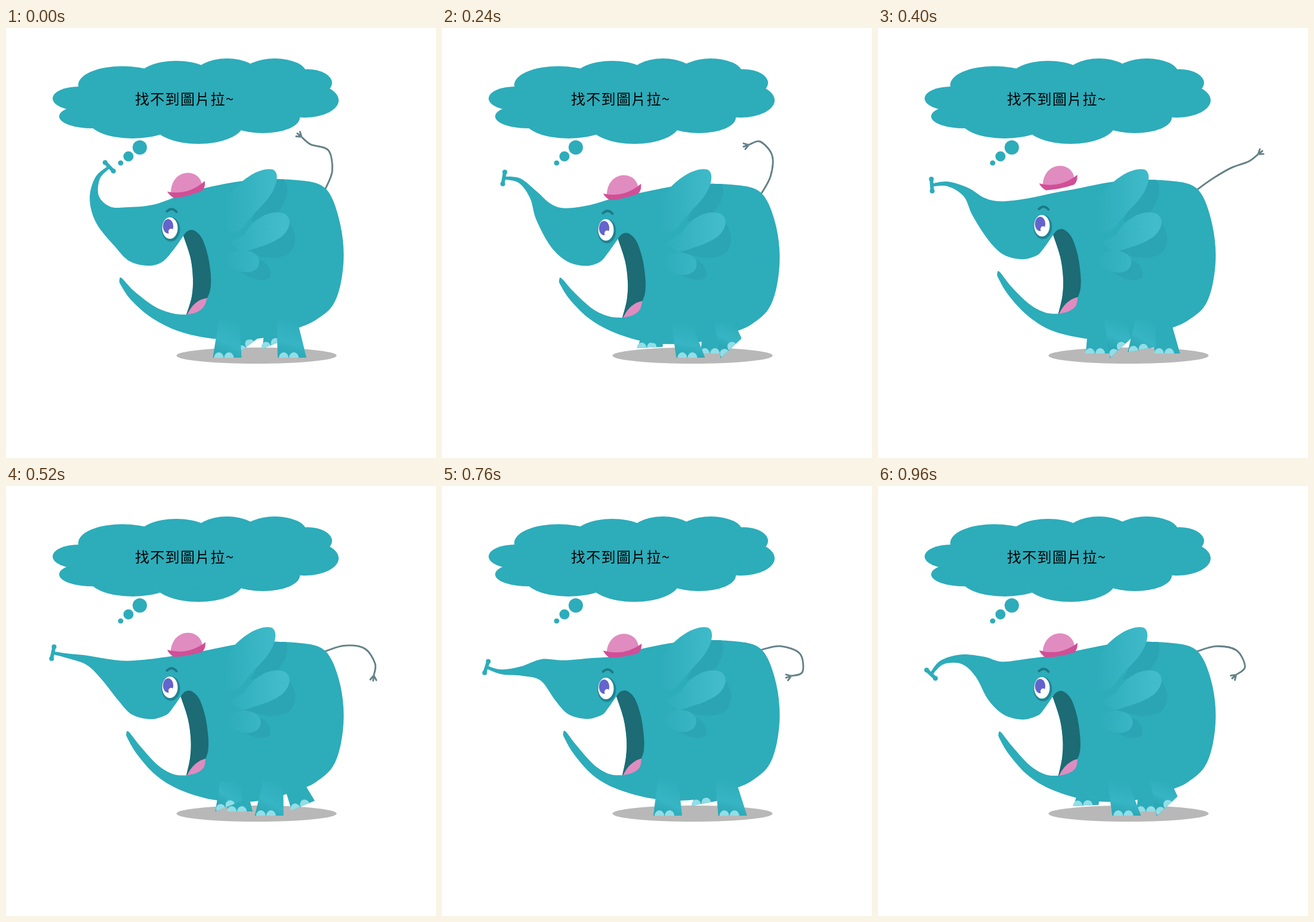
An HTML page with a canvas that plays this animation: 720 px wide and 720 px high, repeating every 1 s.

```html
<!DOCTYPE html>
<html lang="zh-Hant">
<head>
<meta charset="utf-8">
<style>
html, body { margin: 0; width: 100%; height: 100%; overflow: hidden; background: #fff; }
canvas { display: block; }
</style>
</head>
<body>
<canvas id="stage" width="720" height="720"></canvas>
<script>
const ctx = document.getElementById('stage').getContext('2d');
const { PI, sin, cos, exp, sqrt } = Math;
const SKIN = '#2dacba', PINK = '#e08cc0', TOE = '#93dde6', DARK = '#1d6b74';
const rad = deg => deg * PI / 180;

// One stride takes 18 steps of 40 ms; the trunk swings once per loop
const STRIDE = 18;
const GAIT = [0, 3, 6, 10, 13, 17, 18];
const HEAD = [0, 10, 3, -4, 2, -4, 0];
const BELLY = [0, 12, 7, 1, 7, 0, 0];
const HAT = [0, 12, 4, -12, 3, -5, 0];

const SWING = [0, 6, 10, 13, 17, 21, 24];
const TRUNK_MID = [63, 59, 49, 27, -11, 10, 22];
const TRUNK_TIP = [136, 10, -4, 12, 37, -11, -47];

// Smooth interpolation between key values
function at(keys, vals, f) {
  const last = keys.length - 1;
  let i = 0;
  while (i < last - 1 && f >= keys[i + 1]) i++;
  const slope = k => {
    const a = Math.max(k - 1, 0), b = Math.min(k + 1, last);
    return (vals[b] - vals[a]) / (keys[b] - keys[a]);
  };
  const d = keys[i + 1] - keys[i], u = (f - keys[i]) / d, v = 1 - u;
  return v * v * ((1 + 2 * u) * vals[i] + u * d * slope(i)) +
         u * u * ((1 + 2 * v) * vals[i + 1] - v * d * slope(i + 1));
}

// Joints of a limb; side is -1 when angle 0 points left, 1 when it points right
function chain(x, y, angles, lengths, side) {
  const pts = [[x, y]];
  angles.forEach((a, i) => {
    x += side * lengths[i] * cos(rad(a));
    y -= lengths[i] * sin(rad(a));
    pts.push([x, y]);
  });
  return pts;
}

// Adds a curve through the points, joined to what is already in the path
function curve(path, pts, start) {
  path[start ? 'moveTo' : 'lineTo'](...pts[0]);
  for (let i = 0; i < pts.length - 1; i++) {
    const p = pts[i], q = pts[i + 1], a = pts[i - 1] || p, b = pts[i + 2] || q;
    path.bezierCurveTo(p[0] + (q[0] - a[0]) / 6, p[1] + (q[1] - a[1]) / 6,
      q[0] - (b[0] - p[0]) / 6, q[1] - (b[1] - p[1]) / 6, ...q);
  }
  return path;
}

function fill(path, color) { ctx.fillStyle = color; ctx.fill(path); }

function stroke(path, color, width) {
  ctx.strokeStyle = color;
  ctx.lineWidth = width;
  ctx.lineCap = ctx.lineJoin = 'round';
  ctx.stroke(path);
}

function oval(x, y, rx, ry, color) {
  ctx.beginPath();
  ctx.ellipse(x, y, rx, ry, 0, 0, 7);
  ctx.fillStyle = color;
  ctx.fill();
}

function shifted(dx, dy, draw) {
  ctx.save();
  ctx.translate(dx, dy);
  draw();
  ctx.restore();
}

function drawCloud() {
  [[195,95,74,31], [285,85,65,30], [370,80,55,29], [450,76,53,25], [505,92,41,23],
   [500,121,57,29], [430,150,62,26], [322,160,76,34], [212,153,75,32], [145,148,56,20],
   [123,118,45,20], [310,120,190,50], [224,200,12,12], [205,215,8.5,8.5], [192,226,4.5,4.2]
  ].forEach(e => oval(...e, SKIN));
  ctx.fillStyle = '#000';
  ctx.font = '500 24px "Noto Sans CJK TC", "Noto Sans CJK", sans-serif';
  ctx.letterSpacing = '1.3px';
  ctx.fillText('找不到圖片拉~', 216, 128);
}

// The foot slides back on the ground for half a stride, then swings forward
function drawLeg(f, dy, mid, delay, near) {
  const p = (f + delay) % STRIDE / STRIDE, q = Math.max(0, 2 * p - 1);
  const x = mid + (p < .5 ? 138 * p - 34 : 35 - 69 * q * q * (3 - 2 * q));
  const y = (near ? 552 : 545) - 17 * sqrt(sin(PI * q));
  const a = -rad(75) * sin(PI * q) * (1 - q);
  const half = near ? 24 : 21, hip = mid * .4 + x * .6 - 4, top = 488 + dy;
  const cx = half * cos(a), cy = half * sin(a);
  const leg = new Path2D();
  leg.moveTo(hip - 17, top);
  leg.lineTo(x - cx, y - cy);
  leg.lineTo(x + cx, y + cy);
  leg.lineTo(hip + 17, top);
  fill(leg, SKIN);
  if (near) {
    const g = ctx.createLinearGradient(hip + 12, top, x - 14, y);
    g.addColorStop(0, 'rgba(64,190,206,0)');
    g.addColorStop(.6, 'rgba(64,190,206,.5)');
    g.addColorStop(1, 'rgba(40,155,168,.3)');
    fill(leg, g);
  }
  ctx.save();
  ctx.translate(x, y);
  ctx.rotate(a);
  ctx.fillStyle = TOE;
  for (const t of [-14, 3]) {
    ctx.beginPath();
    ctx.ellipse(t, 0, 8, 9, 0, PI, 0);
    ctx.fill();
  }
  ctx.restore();
}

// The tail unrolls from an upward curl into a downward one
function drawTail(t, dy) {
  const curl = s => 1.05 * sin(PI / 2 * cos(PI * s / .75));
  const k = curl(t), bend = 75 * curl(t - .06) - 100 * exp(-12 * t);
  const root = 40 + 28 * k;
  const pts = chain(535, 269 + dy, [root, root + 30 * k, root + 88 * k, root + 88 * k + bend],
    [32, 35, 31, 20], 1);
  const tail = curve(new Path2D(), pts, true);
  const [p, q] = pts.slice(-2), dir = Math.atan2(q[1] - p[1], q[0] - p[0]);
  for (const s of [-.6, 0, .6]) {
    tail.moveTo(...q);
    tail.lineTo(q[0] + 9 * cos(dir + s), q[1] + 9 * sin(dir + s));
  }
  stroke(tail, '#55737a', 2.8);
  stroke(tail, '#7f9ea3', .7);
}

// Tapered trunk: its two edges from base to tip, and the fork at the end
function trunkShape(f, t, x, y) {
  const angles = [16, 37 + 10 * cos(2 * PI * (t - .24) / .85), at(SWING, TRUNK_MID, f),
    120 * exp(-2.5 * t) - 20, at(SWING, TRUNK_TIP, f)];
  const pts = chain(x, y, angles, [36, 35, 33, 33, 27], -1);
  const edge = (half, side) => pts.map(([px, py], i) => {
    const next = angles[i] ?? angles[i - 1];
    const n = rad(i ? (angles[i - 1] + next) / 2 - 10 : 23);
    return [px + side * half[i] * sin(n), py - side * half[i] * cos(n)];
  });
  const half = [51, 34, 18, 8, 4, 2.5];
  const tip = pts[5], n = rad(angles[4]), fx = 10 * sin(n), fy = 10 * cos(n);
  return { upper: edge(half, 1), lower: edge(half, -1), tip,
    fork: [[tip[0] + fx, tip[1] - fy], [tip[0] - fx, tip[1] + fy]] };
}

const EAR_TOP = new Path2D('M360 302C385 255 425 232 447 237C460 244 452 268 440 284C425 303 412 312 400 330C385 350 365 345 360 302');
const EAR_MID = new Path2D('M400 345C418 312 452 303 468 312C480 321 475 338 462 349C445 362 420 368 395 376L375 360Z');
const EAR_LOW = new Path2D('M380 375C400 368 424 375 424 391C424 408 405 412 390 407C370 400 365 385 380 375');
const EAR_SHADE = new Path2D('M448 245C480 252 475 285 455 308L410 325ZM468 322C490 335 488 370 470 380C445 390 420 382 398 374ZM420 386C440 392 446 408 441 418C428 427 405 418 390 406Z');

function drawEar(body, dy) {
  ctx.save();
  ctx.clip(body);
  fill(EAR_SHADE, '#2ba4b3');
  ctx.restore();
  const g = ctx.createLinearGradient(365, 0, 465, 0);
  g.addColorStop(0, SKIN);
  g.addColorStop(1, '#42bccb');
  const sway = dy * .35;
  shifted(-sway, 0, () => fill(EAR_TOP, g));
  fill(EAR_MID, g);
  shifted(sway, dy * .6, () => fill(EAR_LOW, g));
}

function drawEye(dy) {
  shifted(0, dy, () => {
    oval(276, 337, 15.5, 20.5, '#1f8593');
    oval(274.5, 335, 13, 18, '#fff');
    oval(271.5, 332, 8.7, 12, '#6464cc');
    oval(276.5, 341, 4.5, 5, '#fff');
    stroke(new Path2D('M269.5 307Q278 299 285.5 308'), '#1c7a86', 3.8);
  });
}

function drawHat(dy, turn) {
  shifted(302, 271 + dy, () => {
    ctx.rotate(rad(turn));
    fill(new Path2D('M-26 5C-26 -35 20 -38 26 -10Q3 12 -26 5'), PINK);
    fill(new Path2D('M-32 3Q3 10 31 -15L31 -8Q30 -1 26 2Q3 11 -20 14Q-28 10 -32 3'), '#d04f96');
  });
}

function draw(f) {
  const t = f * .04, step = f % STRIDE;
  const head = at(GAIT, HEAD, step), belly = at(GAIT, BELLY, step);
  const rump = belly * 1.1, lip = (head + belly) / 2;

  // The muzzle slowly lifts and pulls back during the loop
  const pull = sin(PI * t / 1.5), lift = 12 * pull * pull;
  const jx = 13 * pull, jy = head - lift, mx = -5 * pull;
  const jaw = (x, y, w, dy = 0) => [x + jx * w, y + jy * w + dy * (1 - w)];

  const { upper, lower, tip, fork } = trunkShape(f, t, 226 + jx * .4, 343 + head - lift);
  const snout = [lower[0][0] + 31, lower[0][1] + 8];
  const corner = [297 + mx, 348 + lip], bottom = [302, 480 + lip];
  const inner = [bottom, [311 + mx * .6, 450 + lip], [313 + mx * .8, 420 + lip],
    [309 + mx, 385 + lip], corner];

  const body = new Path2D();
  curve(body, [...upper.slice().reverse(), [290, 281 + head], [333, 268 + rump], [390, 257 + rump],
    [440, 253 + rump], [490, 255 + rump], [525, 262 + rump], [545, 283 + rump], [560, 330 + rump * .6],
    [565.5, 380 + belly * .6], [560, 430 + belly * .7], [546, 466 + belly * .8], [520, 488 + belly],
    [495, 500 + belly], [445, 516 + belly], [400, 522 + belly], [345, 520 + belly - lift * .2],
    [290, 508 + belly * .5 - lift * .35], jaw(245, 486, .5, belly * .5), jaw(210, 456, .85),
    jaw(192, 430, 1), jaw(190, 422, 1), jaw(194, 419, 1), jaw(215, 441, .8),
    jaw(250, 467, .35, lip), [280, 478 + lip], bottom], true);
  curve(body, inner);
  curve(body, [corner, [corner[0] - 17, corner[1] + 24], [snout[0] + 24, snout[1] - 6], snout, ...lower]);
  body.closePath();

  ctx.fillStyle = '#fff';
  ctx.fillRect(0, 0, 720, 720);
  drawCloud();
  oval(419.5, 548.5, 134, 13.5, '#b8b8b8');
  drawLeg(f, belly, 380, 11, false);
  drawLeg(f, belly, 465, 15, false);
  drawTail(t, rump);
  fill(body, SKIN);

  const end = new Path2D();
  end.moveTo(...fork[0]);
  end.quadraticCurveTo(...tip, ...fork[1]);
  stroke(end, SKIN, 6);
  fork.forEach(p => oval(...p, 4, 4, SKIN));

  drawLeg(f, belly, 389, 2, true);
  drawLeg(f, belly, 467, 6, true);

  const right = [337 + mx * .6, 452 + lip];
  const mouth = curve(new Path2D(), inner, true);
  curve(mouth, [corner, [304 + mx, 340 + lip], [315 + mx, 339 + lip], [328 + mx, 352 + lip],
    [338 + mx, 381 + lip], [343 + mx, 415 + lip], [342 + mx * .8, 438 + lip], right]);
  curve(mouth, [right, [322, 472 + lip], bottom]);
  fill(mouth, DARK);
  const tongue = curve(new Path2D(), [[303, 480 + lip], [312, 466 + lip], [324, 456 + lip], right], true);
  curve(tongue, [right, [331, 467 + lip], [319, 476 + lip], [303, 480 + lip]]);
  fill(tongue, PINK);

  drawEar(body, belly);
  drawEye(head);
  drawHat(at(GAIT, HAT, step), lift * .5);
}

function tick(now) {
  draw(Math.floor(now / 40 + .01) % 25);
  requestAnimationFrame(tick);
}
requestAnimationFrame(tick);
</script>
</body>
</html>
```
